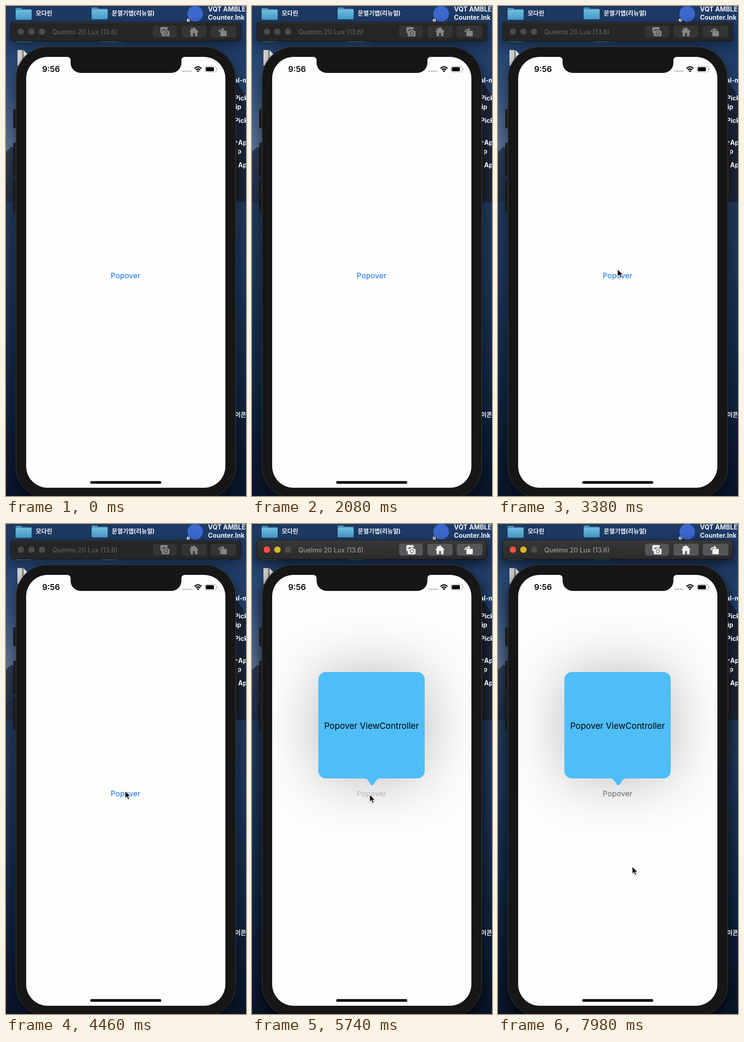
An HTML page for the animation above (8 s loop, 524 by 1069 pixels).

```html
<!DOCTYPE html>
<html lang="ko">
<head>
<meta charset="utf-8">
<title>Popover demo</title>
<style>
  html, body { margin: 0; width: 100%; height: 100%; overflow: hidden; background: #0b1a33; }
  svg { display: block; width: 524px; height: 1069px; }
  text { font-family: Inter, "Noto Sans CJK KR", "Noto Sans CJK", sans-serif; }
  .desk { font-size: 14px; font-weight: 700; fill: #f2f4f8; }
  .ko { font-size: 13px; }
  .mid { text-anchor: middle; }

  /* 8 s loop: window focus at 5420 ms, press at 5520, popover at 5720 */
  .wake { animation: wake 8s step-end infinite; }
  @keyframes wake {
    0% { fill: var(--off); }
    67.75%, 100% { fill: var(--on); }
  }
  .title { --off: #686868; --on: #aaaaaa; }
  .key { --off: #343434; --on: #565658; }
  .icon { --off: #858585; --on: #f1f1f1; }
  .hole { --off: #343434; --on: #565658; }

  .shade { animation: shade 8s step-end infinite; }
  @keyframes shade {
    0% { opacity: .4; }
    67.75%, 100% { opacity: .65; }
  }

  .label { animation: label 8s infinite; }
  @keyframes label {
    0%, 68.99% { fill: #1173e6; }
    69%, 71.49% { fill: #c5dcfc; }
    71.5% { fill: #c9c9c9; }
    71.75% { fill: #c3c3c3; }
    75%, 100% { fill: #828282; }
  }

  .popover { animation: popover 8s step-end infinite; }
  @keyframes popover {
    0% { opacity: 0; }
    71.5%, 100% { opacity: 1; }
  }

  .cursor { animation: cursor 8s infinite; }
  @keyframes cursor {
    0%, 33.75% { transform: translate(530px, 690px); animation-timing-function: ease-out; }
    40.5%, 42.25% { transform: translate(261px, 574px); animation-timing-function: linear; }
    55.75% { transform: translate(260px, 582px); animation-timing-function: ease-in-out; }
    67%, 84% { transform: translate(257px, 590px); animation-timing-function: ease-in-out; }
    95%, 100% { transform: translate(293px, 747px); }
  }
</style>
</head>
<body>
<svg viewBox="0 0 524 1069">
  <defs>
    <linearGradient id="sky" x2="0" y2="1">
      <stop offset="0" stop-color="#1c3860"/>
      <stop offset=".09" stop-color="#24436f"/>
      <stop offset=".2" stop-color="#3d5a84"/>
      <stop offset=".29" stop-color="#5b7092"/>
      <stop offset=".4" stop-color="#33465f"/>
    </linearGradient>
    <linearGradient id="skyRight" x2="0" y2="1">
      <stop offset="0" stop-color="#1d3a66"/>
      <stop offset="1" stop-color="#2b4873"/>
    </linearGradient>
    <linearGradient id="hill" x2="0" y2="1">
      <stop offset="0" stop-color="#2c3b53"/>
      <stop offset="1" stop-color="#1d2c43"/>
    </linearGradient>
    <linearGradient id="sea" x2="0" y2="1">
      <stop offset="0" stop-color="#22395a"/>
      <stop offset=".25" stop-color="#1c3558"/>
      <stop offset=".6" stop-color="#122744"/>
      <stop offset="1" stop-color="#091529"/>
    </linearGradient>
    <linearGradient id="folderFront" x2="0" y2="1">
      <stop offset="0" stop-color="#6cbadd"/>
      <stop offset="1" stop-color="#489fcb"/>
    </linearGradient>
    <linearGradient id="barLit" x2="0" y2="1">
      <stop offset="0" stop-color="#383838"/>
      <stop offset="1" stop-color="#2a2a2a"/>
    </linearGradient>
    <filter id="soft" x="-20%" y="-20%" width="140%" height="140%"><feGaussianBlur stdDeviation="13"/></filter>
    <filter id="glow" filterUnits="userSpaceOnUse" x="-100" y="80" width="730" height="730"><feGaussianBlur stdDeviation="62"/></filter>
    <filter id="drop" x="-50%" y="-50%" width="200%" height="200%">
      <feDropShadow dx="0" dy="1" stdDeviation="1" flood-opacity=".35"/>
    </filter>
    <clipPath id="glass"><rect x="44" y="111" width="435" height="940" rx="47"/></clipPath>
    <g id="folder">
      <path d="M0 4q0-2 2-2h10l3 3h18q2 0 2 2v6H0z" fill="#4890b5"/>
      <rect y="7" width="35" height="21" rx="2" fill="url(#folderFront)"/>
      <path d="M1 8h33" stroke="#8ccbe6" stroke-width=".8"/>
    </g>
  </defs>

  <!-- wallpaper -->
  <rect width="524" height="1069" fill="url(#sky)"/>
  <path d="M260 0H524V430H260z" fill="url(#skyRight)"/>
  <path d="M0 318L12 307L24 314L60 330V450H0z" fill="url(#hill)"/>
  <path d="M480 140L505 168L524 196V440H480z" fill="#1b2439"/>
  <path d="M0 428H524V1069H0z" fill="url(#sea)"/>

  <!-- desktop items -->
  <use href="#folder" x="21" y="2"/>
  <use href="#folder" x="187" y="1"/>
  <path d="M22 77.5h34M209 77.5h34" stroke="#3f8791" stroke-width="2"/>
  <circle cx="413" cy="17" r="17" fill="#3c68cf"/>
  <rect x="395" y="28" width="6" height="6" fill="#e8e8e8"/>
  <path d="M396.5 32.5l3-3m-2 0h2v2" stroke="#333" fill="none" stroke-width=".8"/>
  <path d="M25 96H38L48 107V130H25z" fill="#d8d8d6"/>
  <path d="M38 96L48 107H38z" fill="#f4f4f4"/>
  <path d="M37 96V116" stroke="#55534f" stroke-width="3" stroke-dasharray="2 1"/>

  <!-- window shadows -->
  <g class="shade" filter="url(#soft)">
    <rect x="18" y="98" width="488" height="990" rx="72"/>
    <rect x="10" y="43" width="503" height="42" rx="5"/>
  </g>

  <g class="desk">
    <text class="ko" x="65" y="20">모다린</text>
    <text class="ko" x="231" y="20">문열기앱(리뉴얼)</text>
    <text x="441" y="11.500">VQT AMBLE</text>
    <text x="441" y="30">Counter.lnk</text>
    <text x="498" y="167">al-m</text>
    <text x="499" y="206">Pick</text>
    <text x="501" y="225">ip</text>
    <text x="499" y="255">Pick</text>
    <text x="499" y="303">sAp</text>
    <text x="505" y="322">p</text>
    <text x="499" y="352">sAp</text>
    <text class="ko" x="500" y="896">이콘</text>
  </g>

  <!-- toolbar -->
  <rect x="10" y="35" width="503" height="42" rx="5" fill="#252627"/>
  <rect class="popover" style="animation-name: focus" x="10" y="35" width="503" height="42" rx="5" fill="url(#barLit)"/>
  <style>@keyframes focus { 0% { opacity: 0; } 67.75%, 100% { opacity: 1; } }</style>
  <rect x="10.500" y="35.500" width="502" height="41" rx="4.500" fill="none" stroke="#111" stroke-opacity=".8"/>
  <path d="M15 36.500H508" stroke="#4b4b4b" stroke-opacity=".7"/>
  <circle class="wake" style="--off:#4b4b4b;--on:#ff5047" cx="32.500" cy="56" r="7"/>
  <circle class="wake" style="--off:#4b4b4b;--on:#dfb322" cx="55.500" cy="56" r="7"/>
  <circle cx="78.500" cy="56" r="7" fill="#4d4d4d"/>
  <text class="title wake" x="101" y="61.500" font-size="14.200">Quelmo 20 Lux (13.6)</text>

  <g class="key wake">
    <rect x="321" y="43" width="52" height="26" rx="5"/>
    <rect x="383" y="43" width="55" height="26" rx="5"/>
    <rect x="447" y="43" width="56" height="26" rx="5"/>
  </g>
  <g class="icon wake">
    <path d="M339 46h12q2 0 2 2v3h-10l-1 2h-2v6h-1q-2 0-2-2v-9q0-2 2-2z"/>
    <path d="M342 54h3l1.500-2h5l1.500 2h2q2 0 2 2v8q0 2-2 2h-13q-2 0-2-2v-8q0-2 2-2z"/>
    <path d="M410.500 46L421 56.500H418V66H403V56.500H400L404 52.500V48H406.500V50z"/>
    <rect x="468" y="54" width="14" height="12" rx="1.500"/>
    <path d="M464 57q0-7 8-7v-3l5 4.200l-5 4.200v-3q-5.500 0-5.500 4.600z"/>
  </g>
  <g class="hole wake">
    <circle cx="349" cy="59.500" r="4.300"/>
    <rect x="408.500" y="59" width="4" height="7"/>
  </g>
  <circle class="icon wake" cx="349" cy="59.500" r="3"/>

  <!-- phone -->
  <g fill="#1d1d1d" stroke="#070707">
    <rect x="16.500" y="226" width="10" height="40" rx="2"/>
    <rect x="16.500" y="299" width="10" height="71" rx="2"/>
    <rect x="16.500" y="379" width="10" height="70" rx="2"/>
    <rect x="496" y="299" width="10.500" height="116" rx="2"/>
  </g>
  <rect x="22" y="89" width="479.500" height="985" rx="69" fill="#161616" stroke="#3c3e42"/>
  <rect x="44" y="111" width="435" height="940" rx="47" fill="#fdfdfd"/>

  <text class="label mid wake-label" x="261" y="593.500" font-size="16.500">Popover</text>

  <g class="popover">
    <g clip-path="url(#glass)">
      <rect x="145" y="323" width="232" height="232" rx="16" opacity=".27" filter="url(#glow)"/>
    </g>
    <rect x="145" y="323" width="232" height="232" rx="16" fill="#4fbdf7"/>
    <path d="M243 554.500C252 555 254 560 258 566Q262.500 574 267 566C271 560 273 555 282 554.500z" fill="#4fbdf7"/>
    <text class="mid" x="261" y="446.500" font-size="18.500">Popover ViewController</text>
    <text class="label mid" x="261" y="593.500" font-size="16.500">Popover</text>
  </g>

  <path d="M133 110H391V111Q383 111 383 119V124A22 22 0 0 1 361 146H163A22 22 0 0 1 141 124V119Q141 111 133 111z" fill="#161616"/>

  <!-- status bar -->
  <text x="79" y="144" font-size="17.500" font-weight="600">9:56</text>
  <path d="M385 142.200h20" stroke="#c6c6c6" stroke-width="3.500" stroke-dasharray="4.200 1.100"/>
  <g fill="none" stroke="#000" stroke-width="2.500">
    <path d="M411.500 136.300q7.700-7 15.400 0"/>
    <path d="M414.400 139.500q4.800-4.200 9.600 0"/>
  </g>
  <path d="M416.400 141.500q2.800-2.200 5.600 0l-2.800 3z"/>
  <rect x="434.500" y="131.700" width="25" height="12.300" rx="3.500" fill="none" stroke="#a2a2a2"/>
  <rect x="436.300" y="133.400" width="17.700" height="8.900" rx="2"/>
  <path d="M461 136q1.800 1.800 0 4z" fill="#a2a2a2"/>

  <rect x="184" y="1036.500" width="155" height="5.800" rx="2.900"/>

  <g class="cursor">
    <path d="M0 0V16.500L3.800 13L6.300 19L9.300 17.700L6.800 12H12z" stroke="#fff" stroke-width="1.200" filter="url(#drop)"/>
  </g>
</svg>
</body>
</html>
```
